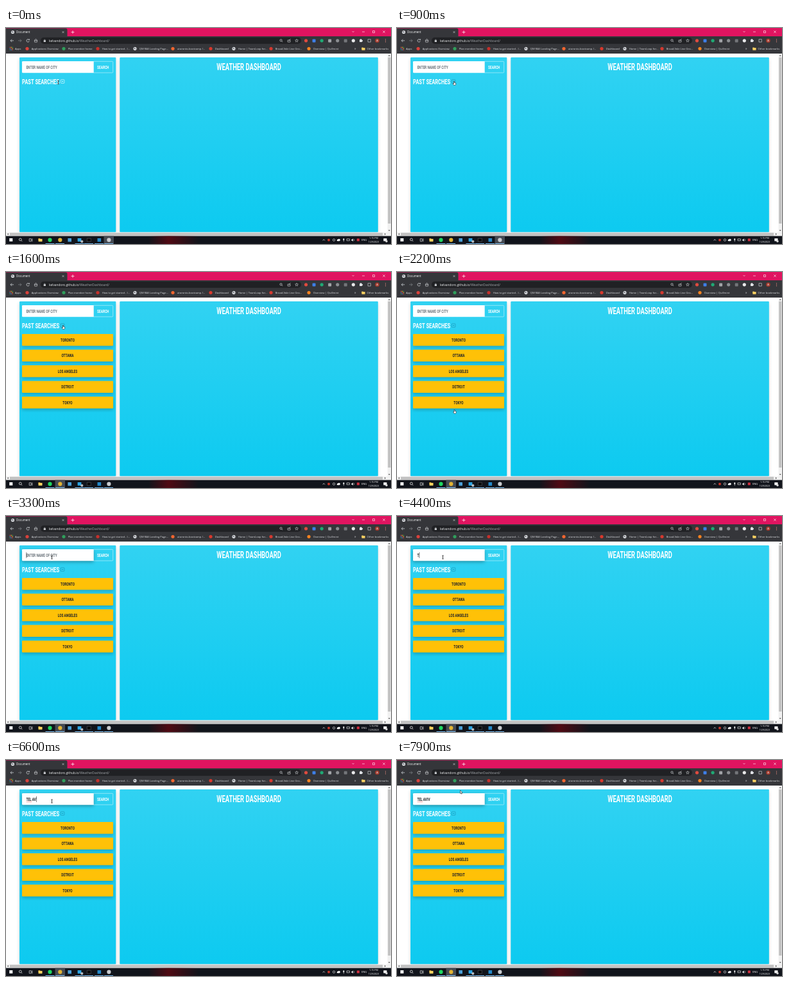
An HTML page with a canvas for the animation above (8 s loop, 600 by 338 pixels).

```html
<!DOCTYPE html>
<html lang="en">
<head>
<meta charset="utf-8">
<title>Weather Dashboard</title>
<style>
  html, body { margin: 0; width: 100%; height: 100%; overflow: hidden; background: #fff; }
  canvas { display: block; width: 600px; height: 338px; }
</style>
</head>
<body>
<canvas id="stage"></canvas>
<script>
const LOOP = 8000, STEP = 100, W = 600, H = 338;
const UI = '"Open Sans", "Noto Sans", sans-serif';
const DISPLAY = 'Roboto, "Liberation Sans", sans-serif';
const CONDENSED = 0.637; // one width for the whole display face
const PINK = '#e01460', BAR = '#35363a', FIELD = '#202124', PALE = '#dfe1e5';

const canvas = document.getElementById('stage');
const dpr = window.devicePixelRatio || 1;
canvas.width = W * dpr;
canvas.height = H * dpr;
const ctx = canvas.getContext('2d');

const cities = ['TORONTO', 'OTTAWA', 'LOS ANGELES', 'DETROIT', 'TOKYO'];
const typing = [[4400, 'T'], [4800, 'TE'], [5000, 'TEL'], [5600, 'TEL '], [6000, 'TEL A'],
  [6500, 'TEL AV'], [6900, 'TEL AVI'], [7100, 'TEL AVIV']];
// time, x, y, shape of the pointer
const pointer = [[0, 81.5, 85, 'beam'], [900, 89, 84, 'hand'], [1700, 89, 84, 'hand'],
  [2200, 89.5, 216, 'hand'], [2600, 92, 220, 'arrow'], [3200, 71.5, 64.5, 'beam'],
  [7700, 71.5, 64.5, 'beam'], [7800, 127, 61, 'beam'], [7900, 98.5, 47.5, 'arrow']];
const bookmarks = [[33, '#d9413b', 'Applications Overview'], [90, '#2f9e5b', 'Plan member home'],
  [143, '#c4302b', 'How to get started - I...'], [201, 'globe', 'QM RAS Landing Page...'],
  [260, '#f0652f', 'utoronto-bootcamp /...'], [319, '#d8382c', 'Dashboard'],
  [355, 'globe', 'Home | TeamLoop for...'], [413, '#d3392f', 'Broad-Vale Line Gro...'],
  [472, '#f58220', 'Overview | Quillmint']];

function rect(x, y, w, h, fill, r = 0) {
  ctx.fillStyle = fill;
  ctx.beginPath();
  ctx.roundRect(x, y, w, h, r);
  ctx.fill();
}

function frame(x, y, w, h, color, lw = 0.6, r = 0) {
  ctx.strokeStyle = color;
  ctx.lineWidth = lw;
  ctx.beginPath();
  ctx.roundRect(x, y, w, h, r);
  ctx.stroke();
}

function dot(x, y, r, fill) {
  ctx.fillStyle = fill;
  ctx.beginPath();
  ctx.arc(x, y, r, 0, 7);
  ctx.fill();
}

function ring(x, y, r, color, lw = 0.7, from = 0, to = 7) {
  ctx.strokeStyle = color;
  ctx.lineWidth = lw;
  ctx.beginPath();
  ctx.arc(x, y, r, from, to);
  ctx.stroke();
}

function line(points, color, lw = 0.7) {
  ctx.strokeStyle = color;
  ctx.lineWidth = lw;
  ctx.beginPath();
  points.forEach(([x, y]) => ctx.lineTo(x, y));
  ctx.stroke();
}

function shape(points, fill, edge) {
  ctx.beginPath();
  points.forEach(([x, y]) => ctx.lineTo(x, y));
  ctx.closePath();
  ctx.fillStyle = fill;
  ctx.fill();
  if (edge) {
    ctx.strokeStyle = edge;
    ctx.lineWidth = 0.6;
    ctx.stroke();
  }
}

function shadowed(blur, dy, alpha, draw) {
  ctx.save();
  ctx.shadowColor = `rgba(0,0,0,${alpha})`;
  ctx.shadowBlur = blur * dpr;
  ctx.shadowOffsetY = dy * dpr;
  draw();
  ctx.restore();
}

function label(s, x, y, size, color, align = 'left') {
  ctx.font = `${size}px ${UI}`;
  ctx.textAlign = align;
  ctx.fillStyle = color;
  ctx.fillText(s, x, y);
  return ctx.measureText(s).width;
}

// Condensed capitals; y is the middle of the capitals. Returns the width.
function caps(s, x, y, size, color, align = 'left', weight = 700) {
  ctx.save();
  ctx.translate(x, y + size * 0.355);
  ctx.scale(CONDENSED, 1);
  ctx.font = `${weight} ${size}px ${DISPLAY}`;
  ctx.textAlign = align;
  ctx.fillStyle = color;
  ctx.fillText(s, 0, 0);
  const width = ctx.measureText(s).width * CONDENSED;
  ctx.restore();
  return width;
}

function globe(x, y) {
  dot(x, y, 2.6, PALE);
  shape([[x - 1.8, y - 1], [x, y - 1.5], [x + 0.3, y], [x - 0.8, y + 1.2]], '#5f6368');
  shape([[x + 0.8, y], [x + 2, y - 0.6], [x + 1.2, y + 1.5]], '#5f6368');
}

function cross(x, y, r, color) {
  line([[x - r, y - r], [x + r, y + r]], color, 0.6);
  line([[x - r, y + r], [x + r, y - r]], color, 0.6);
}

function tabStrip() {
  rect(0, 0, W, 13, PINK);
  rect(0, 0.5, 95.5, 13, BAR, [0, 2.5, 0, 0]);
  globe(10.5, 6.5);
  label('Document', 16, 8.2, 4.4, '#fff');
  cross(89, 6.5, 1.4, PALE);
  line([[101.5, 6.5], [106.5, 6.5]], '#fff');
  line([[104, 4], [104, 9]], '#fff');
  line([[539.5, 5], [541, 6.5], [542.5, 5]], '#fff', 0.6);
  line([[555, 6], [559, 6]], '#fff', 0.6);
  frame(571.5, 4.5, 3, 3, '#fff', 0.6);
  cross(589, 6, 1.7, '#fff');
}

function toolbar() {
  rect(0, 13, W, 27, BAR);
  line([[12, 19.8], [7, 19.8], [9.2, 17.6]], PALE);
  line([[7, 19.8], [9.2, 22]], PALE);
  line([[19, 19.8], [24, 19.8], [21.8, 17.6]], '#85878b');
  line([[24, 19.8], [21.8, 22]], '#85878b');
  ring(34.2, 19.8, 2.2, PALE, 0.7, 0.3, 5.6);
  line([[34.8, 18.7], [36.4, 18.7], [36.4, 17]], PALE);
  line([[43.8, 19.8], [46.5, 17.3], [49.2, 19.8]], PALE);
  frame(44.6, 19.5, 3.8, 2.6, PALE);

  rect(54, 14.8, 406, 10, FIELD, 5);
  rect(58.7, 19.2, 3.2, 2.6, PALE, 0.4);
  ring(60.3, 19, 1, PALE, 0.5, Math.PI, Math.PI * 2);
  const host = label('kelvandoro.github.io', 67, 21.5, 4.85, '#f1f3f4');
  label('/WeatherDashboard/', 67 + host, 21.5, 4.85, '#a4a8ad');
  ring(428.5, 19.3, 1.6, PALE);
  line([[429.7, 20.5], [431.2, 22]], PALE);
  frame(439, 19, 4, 3, PALE);
  line([[440.5, 20], [443.5, 17.2]], PALE);
  const star = Array.from({ length: 11 }, (_, i) => {
    const a = i * Math.PI / 5 - Math.PI / 2, r = i % 2 ? 1.1 : 2.6;
    return [453 + r * Math.cos(a), 19.8 + r * Math.sin(a)];
  });
  line(star, PALE, 0.5);

  ['#e04b3f', '#3f7fe8', '#20a974', '#a2a4a8', '#8b8d91', '#74767a', '#e9e9ea']
    .forEach((c, i) => i % 2 ? rect(477.5 + (i - 1) * 12.3, 17.4, 5, 5, c, 1)
                             : dot(467.5 + i * 12.3, 19.8, 2.6, c));
  rect(551, 18, 4, 4, PALE, 0.5);
  dot(553, 17.8, 0.9, PALE);
  dot(555.2, 20, 0.9, PALE);
  frame(564, 17.7, 4.3, 4.3, PALE);
  dot(578.5, 19.8, 3.3, '#a33b2e');
  label('A', 578.5, 21.3, 4, '#fff', 'center');
  [-2, 0, 2].forEach(d => dot(591.5, 19.8 + d, 0.6, '#f28b82'));
}

function bookmarkBar() {
  for (let i = 0; i < 9; i++) {
    dot(6.2 + (i % 3) * 2, 30.3 + Math.floor(i / 3) * 2, 0.75,
      ['#e8453c', '#f9bb2d', '#3aa757', '#4688f1'][i % 4]);
  }
  label('Apps', 14, 33.9, 4.1, PALE);
  bookmarks.forEach(([x, color, title]) => {
    if (color === 'globe') globe(x, 32.3);
    else dot(x, 32.3, 2.6, color);
    label(title, x + 6.7, 33.9, 4.1, PALE);
  });
  label('»', 543, 34, 5, PALE);
  rect(554.3, 30.4, 2.5, 2, '#f6cf62', 0.4);
  rect(554.3, 31, 5.3, 3.7, '#f6cf62', 0.4);
  label('Other bookmarks', 562.5, 33.9, 4.1, PALE);
}

function scrollbars() {
  rect(594.5, 40, 5.5, 286, '#f1f1f1');
  rect(0, 319.7, W, 6, '#f1f1f1');
  rect(595.2, 46, 4.2, 260, '#c1c1c1');
  rect(6, 320.4, 581, 4.4, '#c1c1c1');
  shape([[595.7, 44], [597.2, 42.2], [598.7, 44]], '#505050');
  shape([[595.7, 316], [597.2, 317.8], [598.7, 316]], '#505050');
  shape([[3.8, 321.1], [2, 322.6], [3.8, 324.1]], '#505050');
  shape([[590, 321.1], [591.8, 322.6], [590, 324.1]], '#505050');
}

function taskbar(t) {
  rect(0, 325.5, W, 12.5, '#11141b');
  const glow = ctx.createLinearGradient(222, 0, 300, 0);
  glow.addColorStop(0, 'rgba(90,8,18,0)');
  glow.addColorStop(0.4, 'rgba(90,8,18,.85)');
  glow.addColorStop(1, 'rgba(90,8,18,0)');
  rect(222, 325.5, 78, 12.5, glow);

  rect(t < 1100 ? 152.5 : 76.5, 325.5, 15.5, 12.5, '#454a53');
  [61.5, 77, 107.5, 122, 138, 153].forEach(x => rect(x, 337, 14, 1, '#76b9ed'));
  rect(5.3, 329, 5, 5, '#fff');
  ring(22.3, 331, 1.9, '#fff');
  line([[23.7, 332.4], [25.3, 334]], '#fff');
  frame(36.2, 329.8, 3, 4, '#fff');
  line([[40.8, 329.5], [40.8, 334.2]], '#fff');
  rect(50.5, 329.2, 2.8, 2, '#e8a92d');
  rect(50.5, 330, 6, 4.2, '#fbd35f', 0.4);
  dot(68.5, 331.7, 3.1, '#1ed760');
  dot(84.3, 331.7, 3.1, '#e3b432');
  rect(96.4, 328.9, 5.6, 5.6, '#4a9fd8', 0.5);
  rect(111.6, 328.9, 5.8, 5.3, '#2ba4e3', 0.6);
  dot(118.3, 334, 2, '#d9dde2');
  label('9', 118.3, 335.2, 3.2, '#222', 'center');
  rect(126.3, 329.2, 6, 5, '#080808');
  frame(126.3, 329.2, 6, 5, '#7d8189', 0.4);
  rect(142.5, 328.9, 5.6, 5.6, '#2489ca', 0.5);
  dot(160.4, 331.7, 3.1, '#c9ccd0');

  line([[493.7, 332.5], [495.3, 330.8], [496.9, 332.5]], '#fff');
  dot(503, 331.7, 2, '#c9362b');
  ring(511, 331.7, 1.7, '#fff', 0.6);
  dot(517.2, 332.2, 1.4, '#fff');
  dot(519, 331.7, 1.8, '#fff');
  rect(525.4, 329.2, 1.8, 3.4, '#fff', 0.9);
  line([[526.3, 333], [526.3, 334.4]], '#fff', 0.6);
  frame(531, 330, 4.4, 2.8, '#fff', 0.6);
  shape([[538.3, 331], [539.3, 331], [540.8, 329.5], [540.8, 334], [539.3, 332.5], [538.3, 332.5]], '#fff');
  ring(540.7, 331.7, 2, '#fff', 0.5, -0.8, 0.8);
  rect(546.8, 329.5, 4, 4, '#d32f3f', 0.5);
  label('ENG', 558.2, 333.3, 4, '#fff', 'center');
  label('1:15 PM', 573, 330.3, 3.7, '#fff', 'center');
  label('1/29/2023', 573, 336, 3.5, '#fff', 'center');
  rect(588.3, 329.2, 5.2, 4.2, '#fff', 0.3);
  dot(593, 333.8, 1.8, '#d6d6d6');
}

function panel(x, w) {
  const g = ctx.createLinearGradient(0, 46, 0, 319.5);
  g.addColorStop(0, '#31d2f2');
  g.addColorStop(1, '#0dcaf0');
  shadowed(5, 2.5, 0.15, () => rect(x, 46, w, 273.5, g, 1.2));
}

function searchBox(t) {
  const focused = t >= 3200;
  const box = () => rect(25, 52, 111.5, 18.3, '#fff', [1.2, 0, 0, 1.2]);
  if (focused) shadowed(5, 2, 0.3, box); else box();
  frame(136.3, 52.3, 30.4, 17.7, 'rgba(255,255,255,.75)', 0.6, [0, 1.2, 1.2, 0]);
  caps('SEARCH', 151.3, 61, 7.5, '#fff', 'center');

  const last = typing.filter(([at]) => t >= at).pop();
  const [since, text] = last || [3200, ''];
  if (!text) caps('ENTER NAME OF CITY', 31.4, 61, 7.55, '#6c757d', 'left', 600);
  const width = text ? caps(text, 31.4, 61, 7.5, '#212529', 'left', 600) : 0;
  if (t >= 5700) {
    const wave = Array.from({ length: 10 }, (_, i) => [31.6 + i * 0.95, 65.2 + (i % 2) * 0.7]);
    line(wave, '#e8453c', 0.5);
  }
  const caretOn = Math.floor((t - since) / 500) % 2 === 0;
  if (focused && caretOn) rect(31.6 + width, 56.8, 0.6, 9, '#212529');
}

function history(t) {
  caps('PAST SEARCHES', 25, 83.7, 11.8, '#fff');
  const color = t < 900 ? '#fff' : '#1d8fb0';
  frame(85.3, 80.8, 5.6, 5.6, color, 0.6, 0.8);
  shape([[86.9, 82.9], [89.3, 82.9], [88.1, 84.5]], color);

  const p = Math.min(1, Math.max(0, (t - 1085) / 400));
  const height = (0.5 - Math.cos(Math.PI * p) / 2) * 122.5;
  if (!height) return;
  ctx.save();
  ctx.beginPath();
  ctx.rect(21, 97, 150, height);
  ctx.clip();
  cities.forEach((city, i) => {
    const y = 97 + i * 24.5;
    shadowed(5, 2.5, 0.2, () => rect(25, y, 142, 18.5, '#ffc107', 1.2));
    caps(city, 96, y + 9.2, 7.45, '#212529', 'center');
  });
  ctx.restore();
}

function drawPointer(t) {
  let i = pointer.length - 1;
  while (pointer[i][0] > t) i--;
  const [t0, x0, y0, kind] = pointer[i];
  const [t1, x1, y1] = pointer[i + 1] || [LOOP, x0, y0];
  const u = (t - t0) / (t1 - t0), e = u * u * (3 - 2 * u);
  ctx.save();
  ctx.translate(x0 + (x1 - x0) * e, y0 + (y1 - y0) * e);
  if (kind === 'beam') {
    line([[0, -2.5], [0, 2.5]], '#111', 0.8);
    line([[-1.3, -2.7], [1.3, -2.7]], '#111', 0.6);
    line([[-1.3, 2.7], [1.3, 2.7]], '#111', 0.6);
  } else if (kind === 'hand') {
    shape([[-0.5, -0.5], [0.5, -0.5], [0.6, 1.6], [2.8, 2.3], [2.5, 4.6], [1.9, 5.4],
      [-0.6, 5.4], [-2, 3], [-1.6, 2.5], [-0.5, 3.2]], '#fff', '#222');
  } else {
    shape([[0, 0], [0, 5], [1.2, 4], [2, 5.7], [2.8, 5.3], [2, 3.7], [3.6, 3.6]], '#fff', '#222');
  }
  ctx.restore();
}

function draw(now) {
  const t = Math.floor((now % LOOP) / STEP) * STEP;
  ctx.setTransform(dpr, 0, 0, dpr, 0, 0);
  rect(0, 0, W, H, '#fff');
  panel(21, 150.3);
  panel(177.3, 402.5);
  caps('WEATHER DASHBOARD', 378.5, 60.7, 14.7, '#fff', 'center');
  searchBox(t);
  history(t);
  scrollbars();
  tabStrip();
  toolbar();
  bookmarkBar();
  taskbar(t);
  drawPointer(t);
}

const start = performance.now();
function tick() {
  draw(performance.now() - start);
  requestAnimationFrame(tick);
}
tick();
</script>
</body>
</html>
```
